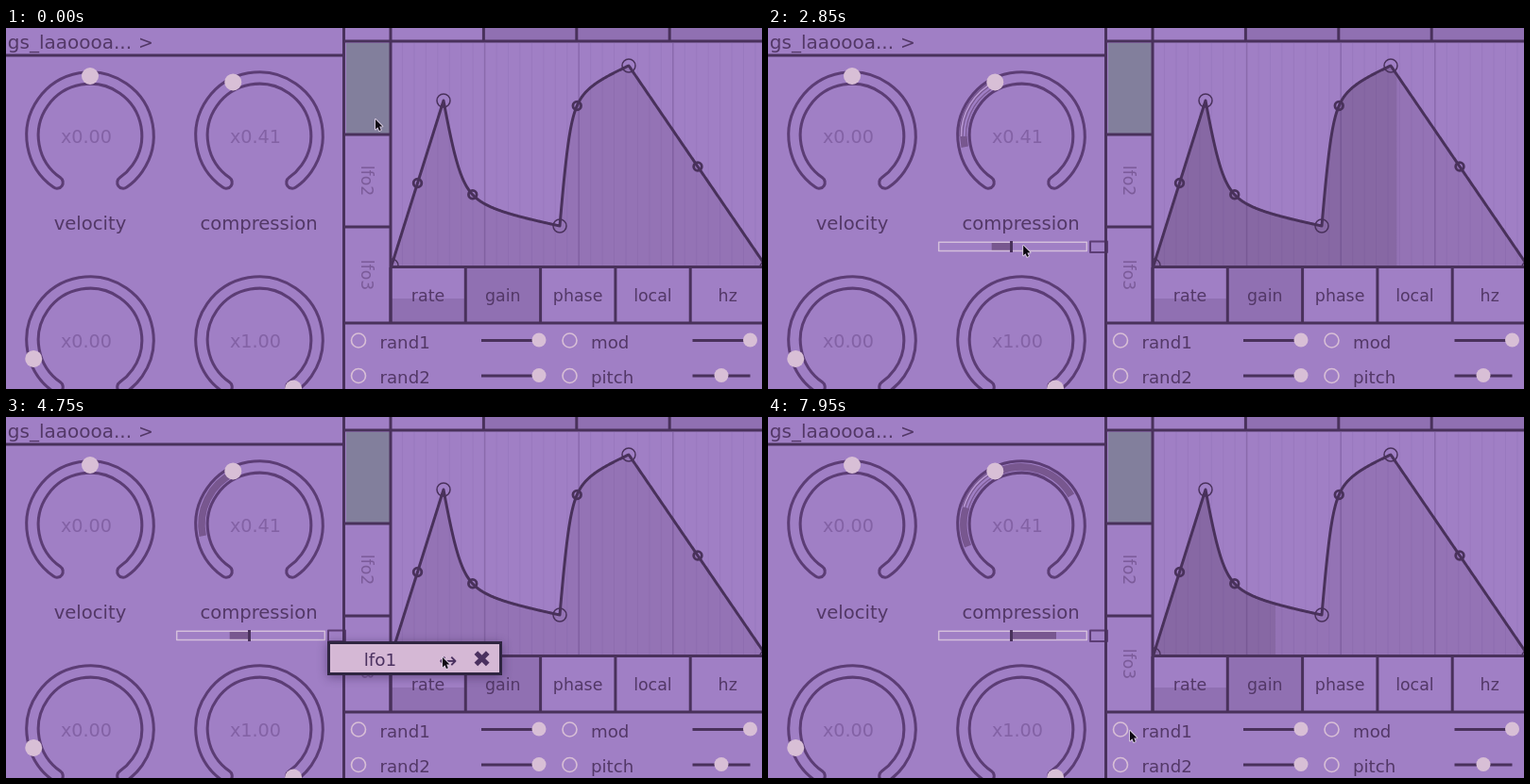
Animation of 800 by 383 pixels, one loop 8000 ms. Source, as an HTML page with a canvas:

```html
<!DOCTYPE html>
<html lang="en">
<head>
<meta charset="utf-8">
<title>Modulation panel</title>
<style>
html, body { margin: 0; width: 100%; height: 100%; overflow: hidden; background: #a07fc5; }
canvas { display: block; width: 800px; height: 383px; }
</style>
</head>
<body>
<canvas id="stage" width="800" height="383"></canvas>
<script>
const c = document.getElementById('stage').getContext('2d');
const LOOP = 8000, STEP = 50;
const BG = '#a07fc5', SHADE = '#9070b2', LINE = '#49315b', RING = '#5c3d75',
  TEXT = '#533867', FAINT = '#8362a5', PINK = '#d8bfd6', BAND = '#78578f';

// Moments of the scene, in ms
const ASSIGN = 600, GRAB = 1450, DROP = 2500, MENU = 3700, FLIP = 4900, CLOSE = 5150,
  REGRAB = 6300, REDROP = 7200;

const between = (t, a, b) => t >= a && t < b;
const clamp = u => Math.min(1, Math.max(0, u));
const smooth = u => u * u * (3 - 2 * u);

// Each move: start, end, then the point reached
const MOVES = [
  [50, 450, 264, 122], [ASSIGN, GRAB, 258.5, 230], [GRAB, 2400, 237.7, 232],
  [2600, 3300, 349, 228], [4000, 4700, 462, 255], [5050, 5950, 286, 235],
  [5950, REGRAB, 238, 232], [REGRAB, 6950, 306, 234], [7250, 7850, 383, 333]
];
function cursorAt(t) {
  let x = 391, y = 97;
  for (const [from, to, nx, ny] of MOVES) {
    const u = smooth(clamp((t - from) / (to - from)));
    x += (nx - x) * u;
    y += (ny - y) * u;
  }
  return [x, y];
}

// The amount follows the cursor while the bar is held
function amountAt(t) {
  if (t < GRAB) return 0;
  const held = t < REGRAB ? Math.min(t, DROP) : Math.min(t, REDROP);
  return (cursorAt(held)[0] - 258.5) / 80;
}

const PHASE = [[GRAB, .65], [4750, 3.003], [5950, 3.917], [7950, 5.325]];
function headAt(t) {
  const i = t < PHASE[1][0] ? 0 : t < PHASE[2][0] ? 1 : 2;
  const [t0, p0] = PHASE[i], [t1, p1] = PHASE[i + 1];
  return (p0 + (p1 - p0) * (t - t0) / (t1 - t0)) % 1;
}

function line(x1, y1, x2, y2, color = LINE, w = 3) {
  c.strokeStyle = color; c.lineWidth = w;
  c.beginPath(); c.moveTo(x1, y1); c.lineTo(x2, y2); c.stroke();
}
function box(x, y, w, h, color) { c.fillStyle = color; c.fillRect(x, y, w, h); }
function disc(x, y, r, color) {
  c.fillStyle = color; c.beginPath(); c.arc(x, y, r, 0, 7); c.fill();
}
function ring(x, y, r, color, w) {
  c.strokeStyle = color; c.lineWidth = w;
  c.beginPath(); c.arc(x, y, r, 0, 7); c.stroke();
}
function label(s, x, y, size = 19.6, color = TEXT, align = 'center') {
  c.font = size + 'px "DejaVu Sans", sans-serif';
  c.fillStyle = color; c.textAlign = align; c.textBaseline = 'alphabetic';
  c.fillText(s, x, y + size * .36);
}

// Knobs
const RADIUS = 61;
const angle = v => (-235 + 290 * v) * Math.PI / 180;
function arc(x, y, r, from, to, w, color, cap = 'butt') {
  c.lineCap = cap; c.lineWidth = w; c.strokeStyle = color;
  c.beginPath();
  c.arc(x, y, r, angle(Math.min(from, to)), angle(Math.max(from, to)));
  c.stroke();
  c.lineCap = 'butt';
}
function modArc(x, y, base, { low, high, now }) {
  arc(x, y, RADIUS, low, high, 7.5, BAND);
  arc(x, y, RADIUS, base, now, 8, BG);
  for (const r of [58.5, 62, 65]) arc(x, y, r, base, now, 1.2, BAND);
  arc(x, y, 63.5, base, now, 1.2, '#b99ad0');
}
function knob(x, y, value, text, mod) {
  arc(x, y, RADIUS, 0, 1, 15.5, RING, 'round');
  arc(x, y, RADIUS, 0, 1, 9.4, BG, 'round');
  if (mod) modArc(x, y, value, mod);
  const a = angle(value);
  disc(x + 63 * Math.cos(a), y + 63 * Math.sin(a), 9, PINK);
  if (mod && mod.held) {
    label('lfo1:', x - 2, y - 10);
    label((mod.amount < 0 ? '–' : '') + Math.abs(mod.amount).toFixed(2), x - 3, y + 12);
  } else label(text, x - 4, y + 1, 19.2, FAINT);
}

// Wave shape
const GX = 408, GW = 397, BASE = 252;
const NODES = [[408, 252], [463, 77], [586, 210], [659, 40], [805, 254]];
const isBent = i => i === 1 || i === 2;
// Conic from (0,0) to (1,1) through (1/4, 3/4)
function bend(u) {
  const k = 2 * u - 1, a = k + 1.5;
  return u + a - Math.sqrt(a * a - 1 + k * k);
}
function waveY(x) {
  let i = 0;
  while (i < 3 && x > NODES[i + 1][0]) i++;
  const [x0, y0] = NODES[i], [x1, y1] = NODES[i + 1];
  const u = (x - x0) / (x1 - x0);
  return y0 + (y1 - y0) * (isBent(i) ? bend(u) : u);
}
function wavePath(end) {
  c.beginPath(); c.moveTo(GX, BASE);
  for (let x = GX; x < end; x += .5) c.lineTo(x, waveY(x));
  c.lineTo(end, waveY(end));
}
function waveFill(end, color) {
  wavePath(end);
  c.lineTo(end, BASE); c.closePath();
  c.fillStyle = color; c.fill();
}

function graph(head) {
  c.save();
  c.beginPath(); c.rect(408, 15, 392, 238); c.clip();
  waveFill(803, '#9473b5');
  if (head !== null) waveFill(GX + GW * head, '#8768a4');
  for (let i = 1; i < 32; i++) {
    const x = 407 + i * 12.45, major = i % 8 === 0;
    line(x, 16, x, BASE, `rgba(80,50,110,${major ? .28 : .07})`, major ? 1.5 : 1);
  }
  wavePath(803);
  c.lineJoin = 'round'; c.strokeStyle = LINE; c.lineWidth = 3; c.stroke();
  NODES.forEach(([x, y], i) => {
    ring(x, y, 7, LINE, 1.5);
    if (i === 4) return;
    const mid = x + (NODES[i + 1][0] - x) * (isBent(i) ? .25 : .5);
    ring(mid, waveY(mid), 4.3, LINE, 2.8);
  });
  c.restore();
}

function leftPanel(mod) {
  label('ngs_laaoooa...', 133, 15, 20, TEXT, 'right');
  label('>', 148, 15, 19);
  line(0, 29, 358, 29);
  knob(89, 114, .5, 'x0.00');
  knob(268, 114, .41, 'x0.41', mod);
  knob(89, 331, .126, 'x0.00');
  knob(268, 331, 1, 'x1.00');
  label('velocity', 89, 207);
  label('compression', 267.5, 207);
}

function amountBar(v) {
  const mid = 257.5, w = v * 80;
  box(Math.min(mid, mid + w), 228, Math.abs(w), 8, BAND);
  c.strokeStyle = '#d3bedb'; c.lineWidth = 1.5;
  c.strokeRect(180.7, 227.2, 156.6, 9.4);
  line(mid, 226, mid, 238);
  c.strokeStyle = RING; c.lineWidth = 2;
  c.strokeRect(341, 226.5, 18, 11.5);
}

function sideTab(s, y) {
  c.save();
  c.translate(382, y); c.rotate(Math.PI / 2);
  label(s, 0, 0, 17.3, '#7b5b99');
  c.restore();
}
function sourceRow(s, x, y, value) {
  ring(x, y, 7.5, PINK, 1.6);
  label(s, x + 22.5, y + 1.5, 18.2, TEXT, 'left');
  line(x + 130, y, x + 191, y);
  disc(x + 130 + 61 * value, y - .5, 7.5, PINK);
}

function rightPanel(head) {
  box(505, 0, 295, 13, SHADE);
  box(360, 16, 46, 96, '#827f9c');
  sideTab('lfo2', 162);
  sideTab('lfo3', 262);
  graph(head);
  box(408, 287, 78, 25, SHADE);
  box(487, 255, 78, 57, SHADE);
  ['rate', 'gain', 'phase', 'local', 'hz'].forEach((s, i) => {
    const x = 407 + 79.3 * i;
    line(x, 254, x, 313);
    label(s, x + 39.5, 284, 17.4);
  });
  for (let i = 1; i < 4; i++) line(407 + 98.4 * i, 0, 407 + 98.4 * i, 14);
  for (const y of [14, 313]) line(358, y, 800, y);
  for (const y of [113, 211]) line(358, y, 407, y);
  line(407, 0, 407, 313);
  line(407, 253.5, 800, 253.5);
  line(357.5, 0, 357.5, 383);
  sourceRow('rand1', 373, 331.5, 1);
  sourceRow('rand2', 373, 369, 1);
  sourceRow('mod', 596.5, 331.5, 1);
  sourceRow('pitch', 596.5, 369, .5);
}

function menu() {
  c.save();
  c.shadowColor = 'rgba(45,25,70,.45)'; c.shadowBlur = 10; c.shadowOffsetY = 2;
  box(340, 238, 185, 36, '#2f2541');
  c.restore();
  box(343, 241, 179, 30, '#d5b8d5');
  label('lfo1', 396, 257, 18.4, '#4b3160');
  label('↔', 468, 257.5, 23, '#4b3160');
  label('✖', 503.5, 256, 24, '#4b3160');
}

function pointer(x, y) {
  const shape = [[0, 0], [0, 10.5], [2.4, 8.3], [4, 12], [5.8, 11.2], [4.2, 7.6], [7.4, 7.4]];
  c.beginPath();
  shape.forEach(([dx, dy]) => c.lineTo(x + dx, y + dy));
  c.closePath();
  c.lineJoin = 'round'; c.strokeStyle = '#d9cce2'; c.lineWidth = 1.8; c.stroke();
  c.fillStyle = '#0d0912'; c.fill();
}

function modAt(t, head) {
  const amount = amountAt(t), base = .41;
  const shift = t >= FLIP ? .5 : 0;
  const wave = head === null ? shift : (BASE - waveY(GX + GW * head)) / 236;
  const ends = [base - amount * shift, base + amount * (1 - shift)];
  return {
    amount, low: Math.min(...ends), high: Math.max(...ends),
    now: base + amount * (wave - shift),
    held: between(t, GRAB, DROP) || between(t, REGRAB, REDROP)
  };
}

function draw(t) {
  const head = t >= GRAB ? headAt(t) : null;
  const mod = t >= ASSIGN ? modAt(t, head) : null;
  box(0, 0, 800, 383, BG);
  leftPanel(mod);
  if (mod) amountBar(mod.amount);
  rightPanel(head);
  if (between(t, MENU, CLOSE)) menu();
  pointer(...cursorAt(t));
}

const start = performance.now();
function tick() {
  const t = (performance.now() - start) % LOOP;
  draw(Math.floor(t / STEP) * STEP);
  requestAnimationFrame(tick);
}
tick();
</script>
</body>
</html>
```
